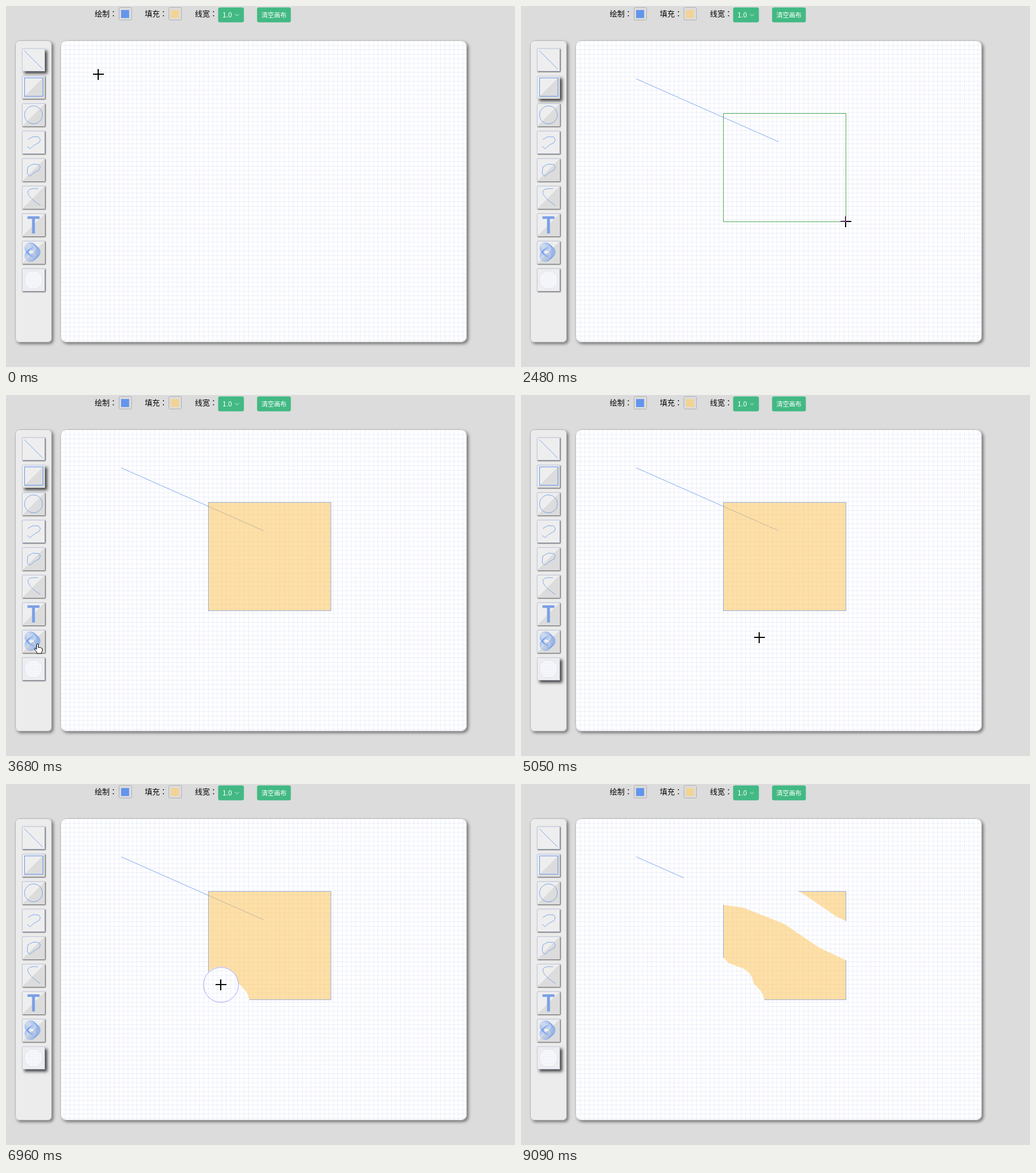
Animation, 889 px wide and 630 px high, one loop 9490 ms. Source, as an HTML page with a canvas:

```html
<!DOCTYPE html>
<html lang="zh">
<head>
<meta charset="utf-8">
<style>
html, body { margin: 0; width: 100%; height: 100%; overflow: hidden; background: #dcdcdc; }
canvas { display: block; }
</style>
</head>
<body>
<canvas id="stage" width="889" height="630"></canvas>
<script>
const stage = document.getElementById('stage');
const ctx = stage.getContext('2d');
const LOOP = 9490, R = 31, THIN = .8;
const BLUE = '#6495ed', GREEN = '#4caa50', JADE = '#42b983';
const FONT = '"Noto Sans CJK TC", "Noto Sans CJK SC", "Noto Sans", sans-serif';

// Each gesture moves the pointer evenly along a polyline in a number of steps
const gestures = [
  { from: 0, to: 150, steps: 2, path: [[161, 119], [201, 129]] },
  { from: 430, to: 1430, steps: 8, path: [[201, 127], [450, 237], [66, 146]] },
  { from: 1580, to: 2480, steps: 7, path: [[198, 199], [353, 187], [567, 376]] },
  { from: 2630, to: 3530, steps: 7, path: [[567, 376], [9, 445]] },
  { from: 3680, to: 4610, steps: 7, path: [[55, 434], [46, 476], [339, 432]] },
  { from: 4750, to: 5350, steps: 5, path: [[441, 430], [390, 415]] },
  { from: 5500, to: 5660, steps: 2, path: [[370, 409], [353, 404]] },
  { from: 5810, to: 6110, steps: 3, path: [[335, 386], [398, 398]] },
  { from: 6260, to: 6810, steps: 5, path: [[394, 380], [377, 362]] },
  { from: 6960, to: 7920, steps: 8, path: [[375, 350], [345, 339], [267, 255], [314, 174], [392, 185]], lag: .1 },
  { from: 8070, to: 8520, steps: 4, path: [[400, 187], [475, 217], [535, 258], [590, 284]] },
  { from: 8670, to: 9090, steps: 4, path: [[650, 340], [920, 720]] }
];
const LINE = 1, RECT = 2, PICK = 4, RUB = 6, EXIT = 11;

function along(path, u) {
  const s = u * (path.length - 1), i = Math.min(Math.floor(s), path.length - 2);
  return path[i].map((v, axis) => Math.round(v + (path[i + 1][axis] - v) * (s - i)));
}

// Current gesture and the part of it that is done
function poseAt(t) {
  const g = gestures.findLastIndex(({ from }) => from <= t);
  const { from, to, steps } = gestures[g];
  const step = Math.min(steps - 1, Math.floor((t - from) / (to - from) * (steps - 1) + .03));
  return [g, step / (steps - 1)];
}

function line(c, points, color, width = THIN) {
  c.beginPath();
  points.forEach(([x, y]) => c.lineTo(x, y));
  c.strokeStyle = color;
  c.lineWidth = width;
  c.stroke();
}

function ring(c, x, y, r, color, width = THIN) {
  c.beginPath();
  c.arc(x, y, r, 0, 7);
  c.strokeStyle = color;
  c.lineWidth = width;
  c.stroke();
}

function frame(c, x, y, w, h, color) {
  c.strokeStyle = color;
  c.lineWidth = 1;
  c.strokeRect(x + .5, y + .5, w, h);
}

function box(c, x, y, w, h, r, fill, border, shadow) {
  c.save();
  c.beginPath();
  c.roundRect(x, y, w, h, r);
  if (shadow) [c.shadowOffsetX, c.shadowBlur, c.shadowColor] = shadow;
  c.shadowOffsetY = c.shadowOffsetX;
  c.fillStyle = fill;
  c.fill();
  c.shadowColor = 'transparent';
  if (border) {
    c.beginPath();
    c.roundRect(x + .5, y + .5, w - 1, h - 1, r);
    c.strokeStyle = border;
    c.stroke();
  }
  c.restore();
}

function text(c, s, x, y, size, color) {
  c.font = `${size}px ${FONT}`;
  c.fillStyle = color;
  c.fillText(s, x, y);
}

function grid(c, x, y, w, h, pitch, color) {
  c.beginPath();
  for (let i = x + pitch; i < x + w; i += pitch) { c.moveTo(i, y); c.lineTo(i, y + h); }
  for (let j = y + pitch; j < y + h; j += pitch) { c.moveTo(x, j); c.lineTo(x + w, j); }
  c.strokeStyle = color;
  c.lineWidth = 1;
  c.stroke();
}

// Icons are drawn in a 40 by 40 button
const scribble = [[10, 15], [19, 10], [29, 10.5], [32, 15], [30, 20], [21, 25], [14, 31], [9, 27]];
const icons = [
  c => line(c, [[4, 4], [36, 36]], BLUE),
  c => frame(c, 4, 3, 32, 32, BLUE),
  c => ring(c, 20, 20, 15.7, BLUE),
  c => line(c, scribble, BLUE),
  c => line(c, [...scribble, scribble[0]], BLUE),
  c => {
    c.beginPath();
    c.moveTo(28, 5);
    c.bezierCurveTo(0, 2, 8, 19, 32, 34);
    c.strokeStyle = BLUE;
    c.lineWidth = THIN;
    c.stroke();
  },
  c => {
    c.fillStyle = '#7b9fe6';
    c.fillRect(9.5, 5, 21, 4.5);
    c.fillRect(17.5, 5, 5, 30);
  },
  c => {
    for (let i = -5; i <= 5; i++) ring(c, 22 - Math.abs(i) * 1.4, 19.5 + i * 1.3, 10, BLUE, .6);
  },
  c => {
    c.save();
    c.beginPath();
    c.arc(20, 20, 16, 0, 7);
    c.clip();
    c.fillStyle = '#fbfbfd';
    c.fillRect(0, 0, 40, 40);
    grid(c, 2, 2, 36, 36, 4, '#eceef6');
    c.restore();
    ring(c, 20, 20, 16, '#dcdfee');
  }
];
const plain = [0, 3, 8];

function button(c, i, selected) {
  c.save();
  c.translate(28, 74 + i * 48);
  box(c, 0, 0, 40, 40, 0, '#eee', '#c3cbe2', [selected ? 4 : 1, selected ? 5 : 2, 'rgba(0,0,0,.7)']);
  if (!plain.includes(i)) {
    c.beginPath();
    c.moveTo(40, 0);
    c.lineTo(40, 40);
    c.lineTo(0, 40);
    c.fillStyle = '#dcdcdc';
    c.fill();
  }
  icons[i](c);
  c.restore();
}

function layer() {
  const cv = document.createElement('canvas');
  cv.width = stage.width;
  cv.height = stage.height;
  return cv.getContext('2d');
}

function drawPage(c) {
  c.fillStyle = '#dcdcdc';
  c.fillRect(0, 0, 889, 630);
  ['绘制：', '填充：', '线宽：'].forEach((s, i) => text(c, s, 155 + i * 87.5, 18, 13, '#000'));
  [BLUE, '#f3d394'].forEach((color, i) => {
    const x = 197 + i * 87;
    box(c, x, 2, 23, 23, 2, '#dcdcdc', '#b0b0b4');
    c.fillStyle = color;
    c.fillRect(x + 4, 7, 14, 14);
  });
  box(c, 370.5, 2.5, 45, 26, 3, JADE);
  text(c, '1.0', 378, 20, 12, '#fff');
  line(c, [[400, 14], [403.5, 17.5], [407, 14]], '#fff');
  box(c, 438.5, 2.5, 59, 26, 3, JADE);
  text(c, '清空画布', 446, 20, 11, '#fff');
  const shadow = [3, 5, 'rgba(0,0,0,.45)'];
  box(c, 16, 60, 64, 527, 7, '#ececec', '#aaa', shadow);
  box(c, 95, 60, 710, 527, 10, '#fff', '#aaa', shadow);
  grid(c, 96, 61, 708, 525, 7.8, 'rgba(100,120,210,.12)');
}

const page = layer(), pen = layer();
drawPage(page);

function rubPose(g, u) {
  const { path, lag = 0 } = gestures[g];
  return along(path, Math.max(0, u - lag));
}

function sweep(g, u) {
  const { path, lag = 0 } = gestures[g];
  return [...path.filter((_, i) => i / (path.length - 1) < u - lag), rubPose(g, u)];
}

function drawArt(g, u) {
  pen.globalCompositeOperation = 'source-over';
  pen.clearRect(0, 0, 889, 630);
  const [x, y] = along(gestures[g].path, u);
  const lineDone = g > LINE || g === LINE && u >= .5;
  if (g >= LINE) line(pen, [[201, 127], lineDone ? [450, 237] : [x, y]], lineDone ? BLUE : GREEN);
  if (g === RECT && u >= .5) frame(pen, 353, 187, x - 353, y - 187, GREEN);
  if (g > RECT) {
    pen.fillStyle = 'rgba(253,194,80,.5)';
    pen.fillRect(353, 187, 215, 190);
    frame(pen, 353, 187, 214, 189, 'rgba(100,149,237,.65)');
  }
  if (g >= RUB) {
    const swept = gestures.slice(RUB, Math.min(g, EXIT)).flatMap(({ path }) => path);
    if (g < EXIT) swept.push(...sweep(g, u));
    pen.globalCompositeOperation = 'destination-out';
    pen.lineCap = pen.lineJoin = 'round';
    line(pen, swept, '#000', 2 * R);
    pen.lineCap = 'butt';
  }
}

const hand = new Path2D('M-1.5 1Q0 -1 1.5 1V7Q3 5.5 4 7Q5.5 6 6.5 7.7Q8 7 8.5 9V12Q8 14 7 15V17H-1V15L-5 10Q-5 7.5 -3 8.5L-1.5 10Z');
const arrow = new Path2D('M0 0V16L4 12.5L6.5 18L9 17L6.5 11.5H11.5Z');

function drawPointer(x, y) {
  ctx.save();
  if (x > 95 && x < 805 && y > 60 && y < 587) {
    // The crosshair inverts what lies below it
    ctx.globalCompositeOperation = 'difference';
    ctx.fillStyle = '#fff';
    ctx.beginPath();
    ctx.rect(x - 9, y - 1, 19, 2);
    ctx.rect(x - 1, y - 9, 2, 19);
    ctx.fill();
  } else {
    const shape = x >= 28 && x <= 68 ? hand : arrow;
    ctx.translate(x, y);
    ctx.fillStyle = '#fff';
    ctx.strokeStyle = '#000';
    ctx.lineWidth = 1;
    ctx.fill(shape);
    ctx.stroke(shape);
  }
  ctx.restore();
}

function draw(t) {
  const [g, u] = poseAt(t);
  const selected = g + u < LINE + 1 ? 0 : g + u < PICK + .5 ? 1 : 8;
  ctx.drawImage(page.canvas, 0, 0);
  icons.forEach((_, i) => button(ctx, i, i === selected));
  drawArt(g, u);
  ctx.drawImage(pen.canvas, 0, 0);
  if (g >= RUB && g < EXIT) {
    const [x, y] = rubPose(g, u);
    ring(ctx, x + .5, y + .5, R - .5, 'rgba(60,60,240,.45)', 1);
  }
  drawPointer(...along(gestures[g].path, u));
}

function tick() {
  draw(performance.now() % LOOP);
  requestAnimationFrame(tick);
}
tick();
</script>
</body>
</html>
```
